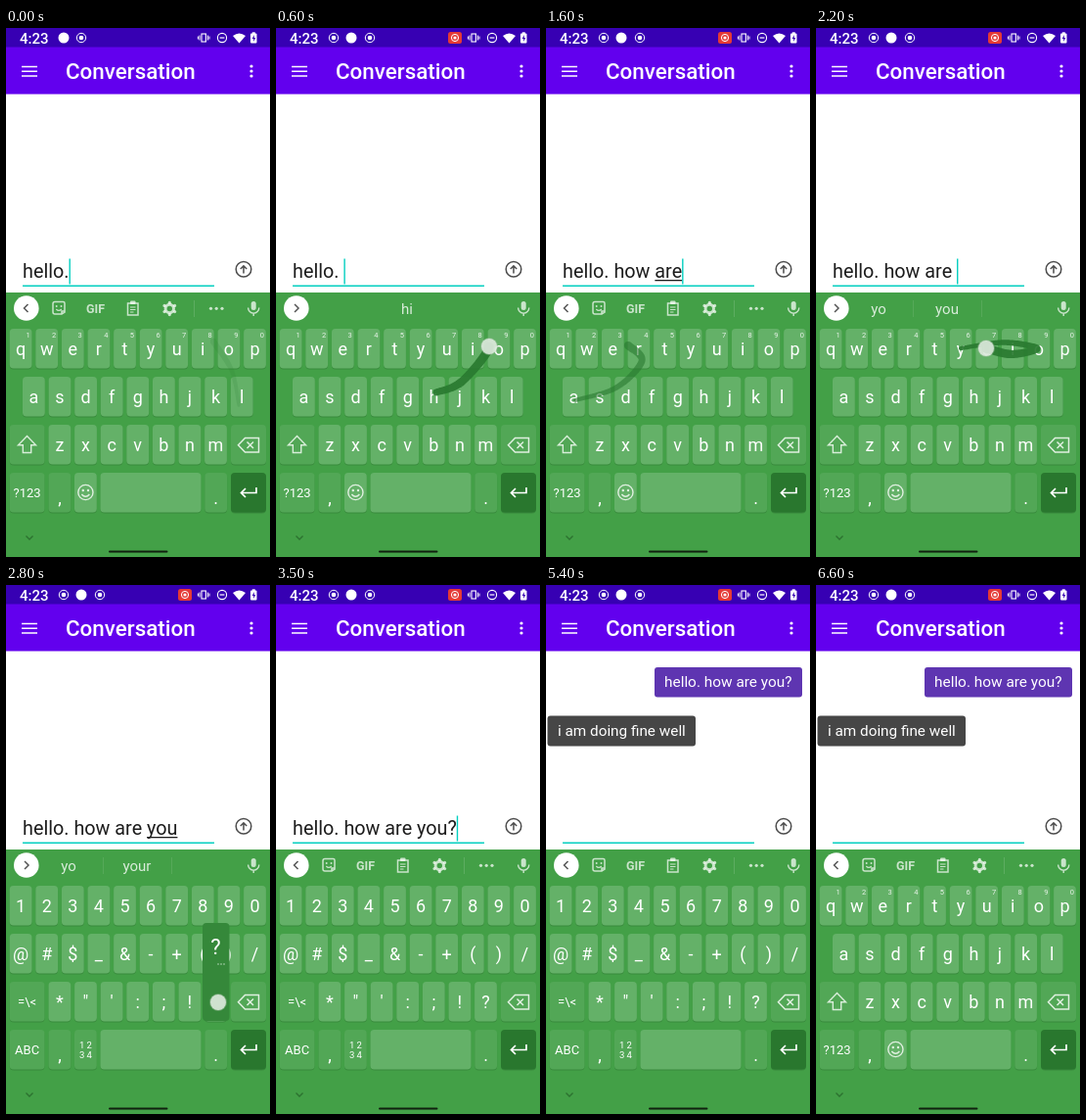
These frames come from a looping animation (270x540 px, 6.7 s). An HTML page with a canvas:

```html
<!DOCTYPE html>
<html lang="en">
<head>
<meta charset="utf-8">
<title>Conversation</title>
<style>
  html, body { margin: 0; width: 100%; height: 100%; overflow: hidden; background: #fff; }
  canvas { display: block; width: 270px; height: 540px; }
</style>
</head>
<body>
<canvas id="stage"></canvas>
<script>
const W = 270, H = 540, LOOP = 6700, TICK = 100;
const canvas = document.getElementById('stage');
const scale = window.devicePixelRatio || 1;
canvas.width = W * scale;
canvas.height = H * scale;
const ctx = canvas.getContext('2d');

const FONT = 'Roboto, "Noto Sans", sans-serif';
const GREEN = '#43a047', KEY = '#64b168', SOFT_KEY = '#52a756', DARK = '#29772e';
const ICON = 'rgba(255,255,255,.72)';

// time, typed text, length of underlined word
const typing = [
  [0, 'hello.', 0],
  [400, 'hello. ', 0],
  [1100, 'hello. how', 3],
  [1200, 'hello. how ', 0],
  [1600, 'hello. how are', 3],
  [1800, 'hello. how are ', 0],
  [2300, 'hello. how are you', 3],
  [3100, 'hello. how are you?', 0],
  [4800, '', 0]
];

// time, suggestions (null shows the tools)
const strips = [
  [0, null],
  [400, ['', 'hi']],
  [800, ['', 'how']],
  [1100, null],
  [1300, ['', 'as']],
  [1500, ['', 'are']],
  [1600, null],
  [1900, ['', 'yo']],
  [2200, ['yo', 'you']],
  [2300, null],
  [2500, ['yo', 'your']],
  [3100, null]
];

const layouts = [[0, 'letters'], [2600, 'symbols'], [6200, 'letters']];

// each swipe: time, x, y
const swipes = [
  [[-450, 238, 385], [-350, 231, 350], [-240, 212, 320]],
  [[400, 164, 372], [500, 190, 361], [600, 218, 325], [700, 196, 317],
   [800, 122, 321], [900, 62, 325], [1000, 41, 328]],
  [[1200, 30, 380], [1300, 72, 367], [1400, 98, 340], [1500, 84, 324]],
  [[1800, 148, 327], [1900, 192, 321], [2000, 226, 327], [2100, 200, 333], [2200, 174, 327]]
];

// start, end, x, y
const taps = [
  [2500, 2600, 21, 475],
  [2700, 3000, 217, 426],
  [4700, 4800, 243, 246],
  [6100, 6200, 21, 475]
];

const at = (table, t) => table.reduce((hit, row) => row[0] <= t ? row : hit);

function text(s, x, y, size, color = '#fff', align = 'left', weight = 400) {
  ctx.font = `${weight} ${size}px ${FONT}`;
  ctx.textAlign = align;
  ctx.fillStyle = color;
  ctx.fillText(s, x, y);
}

function rect(x, y, w, h, color, r = 0) {
  ctx.fillStyle = color;
  ctx.beginPath();
  ctx.roundRect(x, y, w, h, r);
  ctx.fill();
}

function dot(x, y, r, color) {
  ctx.fillStyle = color;
  ctx.beginPath();
  ctx.arc(x, y, r, 0, Math.PI * 2);
  ctx.fill();
}

function ring(x, y, r, color, width) {
  ctx.strokeStyle = color;
  ctx.lineWidth = width;
  ctx.beginPath();
  ctx.arc(x, y, r, 0, Math.PI * 2);
  ctx.stroke();
}

function line(d, color, width) {
  ctx.strokeStyle = color;
  ctx.lineWidth = width;
  ctx.stroke(new Path2D(d));
}

function shape(d, color) {
  ctx.fillStyle = color;
  ctx.fill(new Path2D(d));
}

function recordIcon(x) {
  ring(x, 10, 4.7, '#fff', 1);
  dot(x, 10, 2.3, '#fff');
}

function statusBar(t) {
  rect(0, 0, W, 20, '#3700b3');
  text('4:23', 14, 16, 15, '#fff', 'left', 500);
  if (t < 300) {
    dot(59, 10, 5.5, '#fff');
    recordIcon(77);
  } else {
    recordIcon(59);
    dot(77, 10, 5.5, '#fff');
    recordIcon(96);
    rect(176, 4, 14, 12, '#e53935', 2.5);
    ring(183, 10, 3.6, '#fff', 1);
    dot(183, 10, 1.6, '#fff');
  }
  ctx.strokeStyle = '#fff';
  ctx.lineWidth = 1.1;
  ctx.strokeRect(200, 6, 4.4, 8);
  line('M198 7.5v5M196.4 8.5v3M206.4 7.5v5M208 8.5v3', '#fff', 1);
  ring(221, 10, 4.6, '#fff', 1.1);
  line('M218.6 10h4.8', '#fff', 1.2);
  shape('M232 8Q238.500 3 245 8L238.500 15.500Z', '#fff');
  rect(250, 5.5, 6.5, 10, '#fff', 1);
  rect(251.800, 4.3, 3, 2, '#fff');
  shape('M253.800 7l-2 4h1.400v3l2-4h-1.400z', '#3700b3');
}

function appBar() {
  rect(0, 19.500, W, 48, '#6200ee');
  line('M16 39.500h16M16 44.200h16M16 48.900h16', '#fff', 1.5);
  text('Conversation', 61, 52, 22.4, '#fff', 'left', 500);
  for (const y of [39, 44, 49]) dot(251, y, 1.6, '#fff');
}

function messages(t) {
  if (t >= 4800) {
    rect(111, 84, 151, 30.500, '#5e35b1', 3);
    text('hello. how are you?', 121, 104, 15.4);
  }
  if (t >= 5200) {
    rect(1.5, 133.500, 151.500, 31, '#464646', 3);
    text('i am doing fine well', 12, 153.500, 15.3);
  }
}

function field(t) {
  const [since, typed, marked] = at(typing, t);
  text(typed, 17, 255, 19.8, '#1d1d1d');
  const end = 17 + ctx.measureText(typed).width;
  if (marked) {
    const w = ctx.measureText(typed.slice(-marked)).width;
    rect(end - w, 257, w, 1.3, '#1d1d1d');
  }
  rect(17, 262.500, 196, 1.6, '#03cfc0');
  if ((t - since) % 1000 < 500) rect(end, 235.500, 1.4, 26, '#03cfc0');
  ring(243, 246.300, 7.8, '#4c4c4c', 1.5);
  line('M243 250.500v-7.500M239.800 246l3.200-3.200 3.200 3.200', '#4c4c4c', 1.5);
}

function mic() {
  rect(250.700, 279, 5, 9, ICON, 2.5);
  line('M247.600 285.500a5.600 5.600 0 0 0 11.200 0M253.200 291v3', ICON, 1.4);
}

function tools() {
  line('M60 290V281a1.500 1.500 0 0 0-1.500-1.500H50a2 2 0 0 0-2 2V290a2 2 0 0 0 2 2h7zM57 292v-3h3', ICON, 1.5);
  dot(51.700, 284, 1, ICON);
  dot(56.500, 284, 1, ICON);
  line('M51.300 287q2.700 2.800 5.400 0', ICON, 1.2);
  text('GIF', 91.500, 290.500, 12.5, ICON, 'center', 700);
  line('M124.500 281h10.500v12h-10.500z', ICON, 1.5);
  rect(127, 278.500, 5.500, 3.5, ICON, 1);
  line('M127 285h5.500M127 287.500h5.500M127 290h3.500', ICON, 1);
  ring(167.300, 286.500, 4.2, ICON, 3);
  for (let i = 0; i < 6; i++) {
    const a = i * Math.PI / 3 + Math.PI / 6;
    dot(167.300 + 6.1 * Math.cos(a), 286.500 + 6.1 * Math.sin(a), 1.6, ICON);
  }
  rect(192, 278, 1, 17, 'rgba(255,255,255,.14)');
  for (const x of [209.500, 215.200, 221]) dot(x, 286.300, 1.6, ICON);
}

function strip(t) {
  const words = at(strips, t)[1];
  dot(20.800, 286, 12.800, '#fff');
  line(words ? 'M19 282l4 4-4 4' : 'M22.500 282l-4 4 4 4', '#555', 1.5);
  if (words) {
    words.forEach((word, i) => text(word, 64 + 70 * i, 292, 15, 'rgba(255,255,255,.8)', 'center'));
    if (words[0]) for (const x of [99, 169]) rect(x, 278, 1, 17, 'rgba(255,255,255,.1)');
  } else tools();
  mic();
}

function key(x, y, w, label = '', size = 18, fill = KEY) {
  rect(x, y + 1, w, 40.500, '#398a3d', 4);
  rect(x, y, w, 40.500, fill, 4);
  text(label, x + w / 2, y + 20.500 + size * .35, size, '#fff', 'center');
}

function row(labels, x, y) {
  [...labels].forEach((c, i) => key(x + 26.6 * i, y, 22.8, c));
}

function keyboard(t) {
  const letters = at(layouts, t)[1] === 'letters';
  rect(0, 270, W, 270, GREEN);
  strip(t);
  if (letters) {
    row('qwertyuiop', 3.7, 307);
    [...'1234567890'].forEach((c, i) => text(c, 22.500 + 26.6 * i, 315.500, 7.5, 'rgba(255,255,255,.85)', 'center'));
    row('asdfghjkl', 17, 356);
    row('zxcvbnm', 43.500, 405);
  } else {
    row('1234567890', 3.7, 307);
    row('@#$_&-+()/', 3.7, 356);
    row('*"\':;!?', 43.500, 405);
  }
  key(3.7, 405, 35.800, letters ? '' : '=\\<', 13, SOFT_KEY);
  if (letters) line('M21.500 416.500l9 9.200h-4.800v7.800h-8.400v-7.800h-4.800z', '#d8edd9', 1.4);
  key(230, 405, 36, '', 13, SOFT_KEY);
  line('M244.500 418.500h14v14.500h-14l-7-7.250zM246.500 422.500l6.500 6.500M253 422.500l-6.500 6.500', '#e0f0e0', 1.5);

  key(3.7, 454, 35.800, letters ? '?123' : 'ABC', 13, SOFT_KEY);
  key(43.500, 454, 22.800, '', 18, SOFT_KEY);
  text(',', 55, 485.500, 18, '#fff', 'center');
  key(70, 454, 22.800, '', 18, letters ? KEY : SOFT_KEY);
  if (letters) {
    ring(81.400, 474, 7.6, '#e0f0e0', 1.4);
    dot(78.800, 472, 1.2, '#e0f0e0');
    dot(84, 472, 1.2, '#e0f0e0');
    line('M77.400 476q4 4.500 8 0', '#e0f0e0', 1.5);
  } else {
    text('1 2', 81.400, 473, 9.5, '#fff', 'center');
    text('3 4', 81.400, 483, 9.5, '#fff', 'center');
  }
  key(96.500, 454, 103, '');
  key(203.300, 454, 22.800, '', 18, SOFT_KEY);
  text('.', 214.700, 485.500, 18, '#fff', 'center');
  key(230, 454, 36, '', 18, DARK);
  line('M256 469v5.500h-15.500M245 470l-4.500 4.500 4.500 4.500', '#fff', 1.7);

  line('M20.500 518.500l3.500 3.500 3.500-3.500', '#2c7230', 1.4);
  rect(105, 533.500, 60.500, 2, '#10200f', 1);
}

// smooth position along a swipe
function along(path, t) {
  let i = 0;
  while (i < path.length - 2 && path[i + 1][0] <= t) i++;
  const p = k => path[Math.max(0, Math.min(path.length - 1, k))];
  const a = p(i - 1), b = p(i), c = p(i + 1), d = p(i + 2);
  const u = Math.max(0, Math.min(1, (t - b[0]) / (c[0] - b[0])));
  return [1, 2].map(n => b[n] + u / 2 * (c[n] - a[n]
    + u * (2 * a[n] - 5 * b[n] + 4 * c[n] - d[n]
    + u * (3 * (b[n] - c[n]) + d[n] - a[n]))));
}

function trail(path, t) {
  const start = path[0][0], end = path[path.length - 1][0];
  const fade = 1 - Math.max(0, t - end) / 290;
  if (t < start || fade <= 0) return;
  ctx.beginPath();
  for (let s = Math.max(start, t - 600); s <= Math.min(t, end); s += 3) {
    const [x, y] = along(path, s);
    const r = 4.8 * (1 - (t - s) / 700);
    ctx.moveTo(x + r, y);
    ctx.arc(x, y, r, 0, Math.PI * 2);
  }
  ctx.globalAlpha = fade * .92;
  ctx.fillStyle = '#2a7a30';
  ctx.fill();
  ctx.globalAlpha = 1;
  if (t <= end) pointer(...along(path, t));
}

function pointer(x, y) {
  dot(x, y, 9, 'rgba(160,190,160,.45)');
  dot(x, y, 8, 'rgba(226,236,226,.85)');
}

function popup() {
  rect(201, 345, 27.500, 100, '#35883a', 4);
  text('?', 214.500, 377, 22, '#fff', 'center');
  for (const x of [217, 220, 223]) dot(x, 387, .7, '#d5ead6');
}

function draw(t) {
  ctx.setTransform(scale, 0, 0, scale, 0, 0);
  rect(0, 0, W, H, '#fff');
  statusBar(t);
  appBar();
  messages(t);
  field(t);
  keyboard(t);
  swipes.forEach(path => trail(path, t));
  if (t >= 2700 && t < 3000) popup();
  for (const [from, to, x, y] of taps) if (t >= from && t < to) pointer(x, y);
}

const begin = performance.now();
function tick() {
  const t = (performance.now() - begin) % LOOP;
  draw(Math.floor(t / TICK) * TICK);
  requestAnimationFrame(tick);
}
tick();
</script>
</body>
</html>
```
